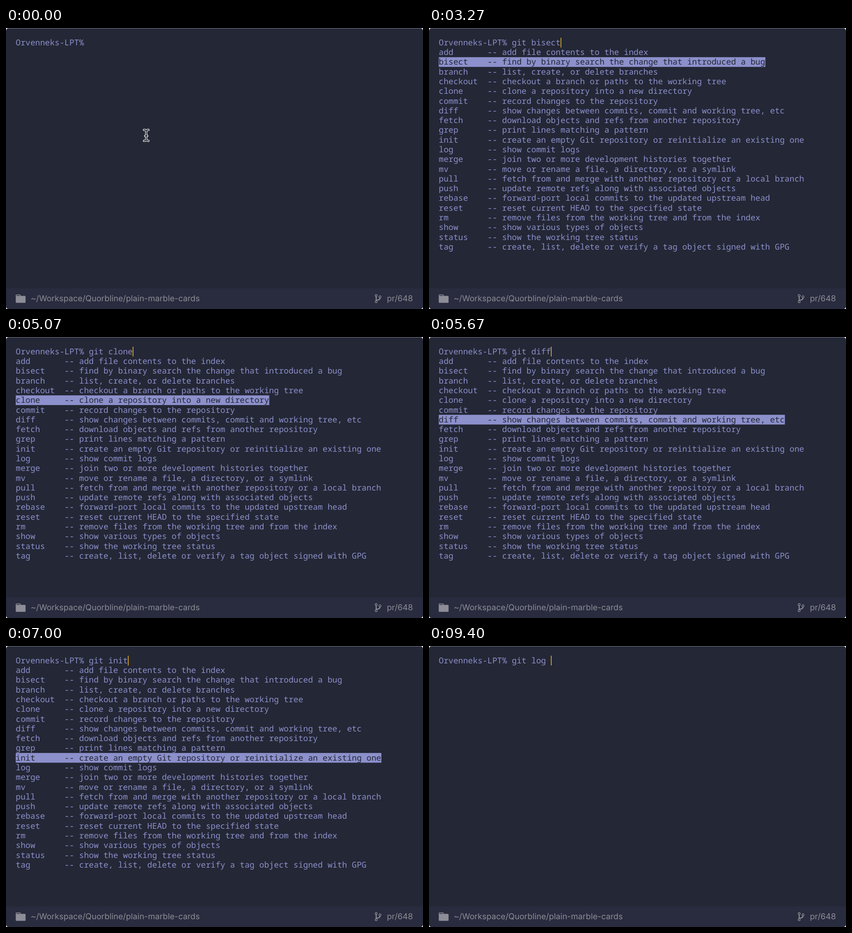
Animation of 910 by 615 pixels, one loop 9.74 s. Source, as an HTML page:

```html
<!DOCTYPE html>
<html lang="en">
<head>
<meta charset="utf-8">
<title>Terminal completion</title>
<style>
  html, body { margin: 0; width: 100%; height: 100%; overflow: hidden; background: #fff; }
  svg { display: block; width: 910px; height: 615px; }
  text { white-space: pre; text-rendering: geometricPrecision; }
  .term { font: 17.73px "Noto Sans Mono", monospace; fill: #8c90cb; }
  .term .picked { fill: #242735; }
  .bar { font: 17.75px Inter, sans-serif; fill: #8c8d96; }
</style>
</head>
<body>
<svg viewBox="0 0 910 615" xmlns="http://www.w3.org/2000/svg">
  <defs>
    <clipPath id="window"><rect width="910" height="615" rx="6"/></clipPath>
    <path id="beam" d="M-5 -12H-4C-1.5 -12 0 -10.6 0 -8.6V8.6C0 10.6 -1.5 12 -4 12H-5M5 -12H4C1.5 -12 0 -10.6 0 -8.6M0 8.6C0 10.6 1.5 12 4 12H5M-2.4 1.2H2.4"/>
  </defs>
  <g clip-path="url(#window)">
    <rect width="910" height="615" fill="#242735"/>
    <rect y="570" width="910" height="45" fill="#292c3e"/>
    <path d="M0 6A6 6 0 0 1 6 .5H904A6 6 0 0 1 910 6" fill="none" stroke="#777985"/>
  </g>

  <path fill="#8c8d96" fill-rule="evenodd" d="M22.8 583.2H30.4Q32 583.2 32 584.8V586.3H41.2Q42.7 586.3 42.7 587.8V600Q42.7 601.5 41.2 601.5H22.8Q21.3 601.5 21.3 600V584.8Q21.3 583.2 22.8 583.2ZM22.8 584.8V586.3H30.4V584.8Z"/>
  <g fill="none" stroke="#8c8d96">
    <g stroke-width="1.3">
      <circle cx="807.8" cy="585.7" r="2.2"/>
      <circle cx="816.2" cy="588.4" r="2.2"/>
      <circle cx="807.8" cy="598.9" r="2.2"/>
    </g>
    <path d="M807.8 587.6V597M816.2 590.4C816 593.4 814 595 811.6 595.1Q809.2 595.2 808.2 597" stroke-width="2.2"/>
  </g>
  <text class="bar" x="54" y="598.4">~/Workspace/Quorbline/plain-marble-cards</text>
  <text class="bar" x="888" y="598.4" text-anchor="end">pr/648</text>

  <g class="term">
    <text id="prompt" x="21.3" y="37.9"></text>
    <g id="menu"><rect id="mark" x="21.3" height="21.28" fill="#8c90cb"/></g>
  </g>
  <rect id="caret" y="21.3" width="1.4" height="21.3" fill="#fcc41f"/>
  <g id="mouse" fill="none" stroke-linecap="round" stroke-linejoin="round">
    <use href="#beam" stroke="#fff" stroke-width="4.4"/>
    <use href="#beam" stroke="#11131b" stroke-width="1.8"/>
  </g>
</svg>
<script>
const LOOP = 9740, BLINK = 600;
const LEFT = 21.3, CELL = 10.638, ROW = 21.28;
const HOST = "Orvenneks-LPT% ";

const commands = `add|add file contents to the index
bisect|find by binary search the change that introduced a bug
branch|list, create, or delete branches
checkout|checkout a branch or paths to the working tree
clone|clone a repository into a new directory
commit|record changes to the repository
diff|show changes between commits, commit and working tree, etc
fetch|download objects and refs from another repository
grep|print lines matching a pattern
init|create an empty Git repository or reinitialize an existing one
log|show commit logs
merge|join two or more development histories together
mv|move or rename a file, a directory, or a symlink
pull|fetch from and merge with another repository or a local branch
push|update remote refs along with associated objects
rebase|forward-port local commits to the updated upstream head
reset|reset current HEAD to the specified state
rm|remove files from the working tree and from the index
show|show various types of objects
status|show the working tree status
tag|create, list, delete or verify a tag object signed with GPG`
  .split("\n").map(line => line.split("|"));

// Key presses: time, typed text, menu open, picked row
const keys = [
  [400, "g"], [530, "gi"], [600, "git"], [800, "git "],
  [2470, "git ", true, -1],
  ...[3070, 3270, 3470, 3600, 3800, 5400, 5670, 5800, 6670, 6870, 7470]
    .map((time, i) => [time, "git " + commands[i][0], true, i]),
  [8200, "git log "]
];

const el = id => document.getElementById(id);
const prompt = el("prompt"), menu = el("menu"), mark = el("mark");
const caret = el("caret"), mouse = el("mouse");
const show = (node, on) => node.setAttribute("visibility", on ? "visible" : "hidden");

const rows = commands.map(([name, info], i) => {
  const text = document.createElementNS("http://www.w3.org/2000/svg", "text");
  text.textContent = name.padEnd(10) + "-- " + info;
  text.setAttribute("x", LEFT);
  text.setAttribute("y", 37.9 + ROW * (i + 1));
  menu.append(text);
  return text;
});

function draw(t) {
  const [since, typed, open = false, pick = -1] =
    keys.findLast(key => key[0] <= t) || [0, ""];
  const line = HOST + typed;
  prompt.textContent = line;

  menu.setAttribute("display", open ? "inline" : "none");
  rows.forEach((row, i) => row.classList.toggle("picked", i === pick));
  show(mark, open && pick >= 0);
  if (pick >= 0) {
    mark.setAttribute("y", LEFT + ROW * (pick + 1));
    mark.setAttribute("width", rows[pick].textContent.length * CELL);
  }

  // Every key press restarts the blink
  show(caret, typed && Math.floor((t - since) / BLINK) % 2 === 0);
  caret.setAttribute("x", LEFT + line.length * CELL);

  const passing = t >= 8870 && t < 8930;
  show(mouse, t < 400 || passing);
  mouse.setAttribute("transform", passing ? "translate(319 214)" : "translate(306 235)");
}

const start = performance.now();
function tick() {
  draw((performance.now() - start) % LOOP);
  requestAnimationFrame(tick);
}
tick();
</script>
</body>
</html>
```
